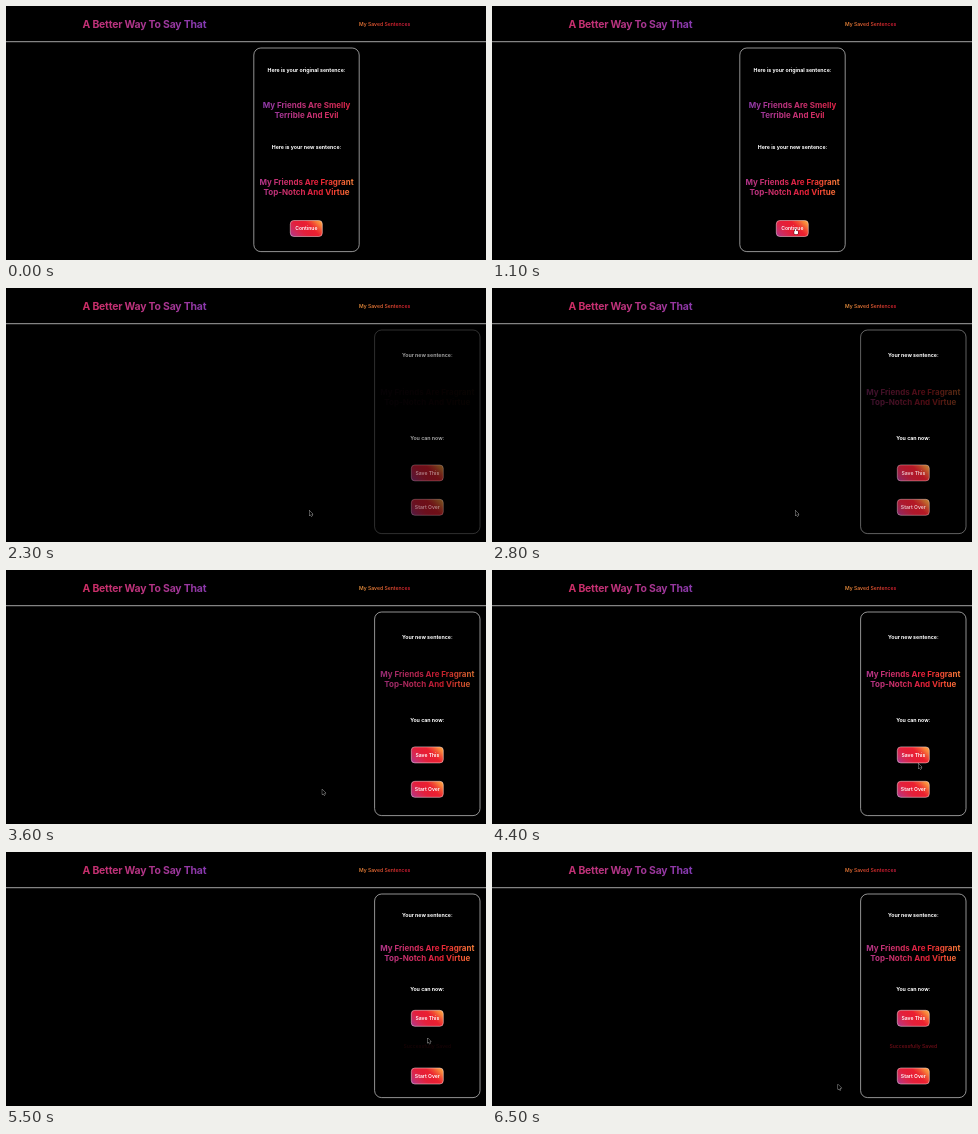
An HTML page with a canvas for the animation above (6.6 s loop, 480 px wide and 254 px high).

```html
<!DOCTYPE html>
<html lang="en">
<head>
<meta charset="utf-8">
<title>A Better Way To Say That</title>
<style>
  html, body { margin: 0; width: 100%; height: 100%; overflow: hidden; background: #000; }
  canvas { display: block; width: 480px; height: 254px; }
</style>
</head>
<body>
<canvas id="stage"></canvas>
<script>
const W = 480, H = 254, LOOP = 6600, STEP = 100;
const SWAP = 1400, SAVED = 5000;
const canvas = document.getElementById('stage');
const ctx = canvas.getContext('2d');
const dpr = window.devicePixelRatio || 1;
canvas.width = W * dpr;
canvas.height = H * dpr;

const FONT = 'Inter, "Liberation Sans", sans-serif';
const RESULT = ['My Friends Are Fragrant', 'Top-Notch And Virtue'];
const PALETTE = ['#5851db', '#833ab4', '#b83380', '#d02c60', '#ea1c30', '#f77737', '#fcaf45']
  .map(hex => [1, 3, 5].map(i => parseInt(hex.substr(i, 2), 16)));

// key points of the pointer: time, x, y
const PATH = [[100, 312, 245], [1000, 303.5, 222.5], [3400, 303.5, 222.5], [4400, 426.5, 193.5],
              [4800, 421.5, 186], [5500, 421.5, 186], [6500, 346, 232.5]];

const clamp = v => Math.max(0, Math.min(1, v));
const ramp = (t, from, length) => clamp((t - from) / length);
const smooth = p => p * p * (3 - 2 * p);
const lerp = (a, b, p) => a + (b - a) * p;
const linear = p => p;
// lingers around the middle of the range
const linger = p => 0.5 + 2 * (p - 0.5) * Math.abs(p - 0.5);

function tone(pos) {
  const p = Math.max(0, Math.min(PALETTE.length - 1.001, pos));
  const i = Math.floor(p);
  return `rgb(${PALETTE[i].map((c, k) => Math.round(lerp(c, PALETTE[i + 1][k], p - i)))})`;
}

function blend(x0, y0, x1, y1, from, to, curve = linear) {
  const g = ctx.createLinearGradient(x0, y0, x1, y1);
  for (let p = 0; p <= 1; p += 0.125) g.addColorStop(p, tone(lerp(from, to, curve(p))));
  return g;
}

function text(str, x, y, size, weight, fill, align = 'center', spacing = 0) {
  ctx.font = `${weight} ${size}px ${FONT}`;
  ctx.letterSpacing = spacing + 'px';
  ctx.textAlign = align;
  ctx.fillStyle = fill;
  ctx.fillText(str, x, y + size * 0.36);
}

function box(x, y, w, h, r, stroke, fill) {
  ctx.beginPath();
  ctx.roundRect(x, y, w, h, r);
  if (fill) {
    ctx.fillStyle = fill;
    ctx.fill();
  }
  ctx.strokeStyle = stroke;
  ctx.lineWidth = 0.7;
  ctx.stroke();
}

function withAlpha(alpha, paint) {
  ctx.save();
  ctx.globalAlpha = clamp(alpha);
  paint();
  ctx.restore();
}

const card = x => box(x - 52.7, 42, 105.4, 203.6, 7, '#d0d0d0');
const label = (str, x, y) => text(str, x, y, 5.25, 700, '#fff');

function sentence(lines, x, y, from, to) {
  const fill = blend(x - 48, y + 13, x + 48, y - 4, from, to);
  lines.forEach((line, i) => text(line, x, y + i * 10, 8, 700, fill));
}

function button(str, x, y) {
  box(x - 16, y - 8, 32, 16, 3.5, 'rgba(255,215,220,0.75)',
      blend(x - 12, y + 12, x + 12, y - 12, 1.4, 6.4, linger));
  text(str, x, y - 0.2, 5.05, 600, '#fff');
}

function header(shift) {
  text('A Better Way To Say That', 76.5, 17.8, 10.4, 700,
       blend(77, 0, 200, 0, 2.4 + shift, 1 + shift * 0.3), 'left', -0.17);
  text('My Saved Sentences', 353, 17.9, 5.1, 500,
       blend(353, 0, 404, 0, 5.2 + shift, 3.5 + shift), 'left');
  ctx.fillStyle = '#a4a4a4';
  ctx.fillRect(0, 35.2, W, 1);
}

function firstCard() {
  const x = 300.5;
  card(x);
  label('Here is your original sentence:', x, 64.5);
  sentence(['My Friends Are Smelly', 'Terrible And Evil'], x, 98.7, 1, 3.7);
  label('Here is your new sentence:', x, 141.6);
  sentence(RESULT, x, 175.7, 1.7, 5.2);
  button('Continue', x - 0.2, 222.5);
}

function secondCard(t) {
  const x = 421.3, saved = t >= SAVED;
  const fade = ramp(t, 1500, 1700);
  withAlpha(fade ** 1.5, () => card(x));
  withAlpha(fade * 1.3, () => {
    label('Your new sentence:', x, saved ? 63 : 67.6);
    label('You can now:', x, saved ? 137 : 150.6);
  });
  withAlpha(fade, () => {
    button('Save This', x, saved ? 166.3 : 184.9);
    button('Start Over', x, saved ? 224 : 219.3);
  });
  withAlpha(ramp(t, 2250, 1600), () =>
    sentence(RESULT, x, saved ? 95.8 : 104.6, 1.7, 5.2));
  withAlpha(ramp(t, 5250, 2500), () =>
    text('Successfully Saved', x, 194.3, 5.1, 500, tone(4)));
}

function tipAt(t) {
  const next = PATH.findIndex(key => key[0] > t);
  if (next < 0) return PATH[PATH.length - 1].slice(1);
  const [t0, x0, y0] = PATH[next - 1], [t1, x1, y1] = PATH[next];
  const p = smooth(ramp(t, t0, t1 - t0));
  return [lerp(x0, x1, p), lerp(y0, y1, p)];
}

function pointer(t) {
  if (t < PATH[0][0]) return;
  const [x, y] = tipAt(t);
  const hand = (t >= 800 && t < SWAP) || (t >= 4700 && t < SAVED);
  ctx.beginPath();
  if (hand) {
    ctx.roundRect(x - 0.6, y, 1.2, 4, 0.6);
    ctx.roundRect(x - 1.3, y + 2.3, 3.8, 3.5, 1);
  } else {
    [[0, 0], [0, 5], [1.1, 4], [1.9, 5.8], [2.7, 5.4], [2, 3.7], [3.5, 3.6]]
      .forEach(([dx, dy]) => ctx.lineTo(x + dx, y + dy));
    ctx.closePath();
  }
  ctx.strokeStyle = hand ? '#000' : '#eee';
  ctx.fillStyle = hand ? '#fff' : '#000';
  ctx.lineWidth = 0.65;
  ctx.stroke();
  ctx.fill();
}

function draw(t) {
  ctx.setTransform(dpr, 0, 0, dpr, 0, 0);
  ctx.fillStyle = '#000';
  ctx.fillRect(0, 0, W, H);
  header(0.5 * Math.sin(Math.PI * t / LOOP));
  if (t < SWAP) firstCard();
  else secondCard(t);
  pointer(t);
}

const start = performance.now();
function tick() {
  const t = (performance.now() - start) % LOOP;
  draw(Math.floor(t / STEP) * STEP);
  requestAnimationFrame(tick);
}
tick();
</script>
</body>
</html>
```
